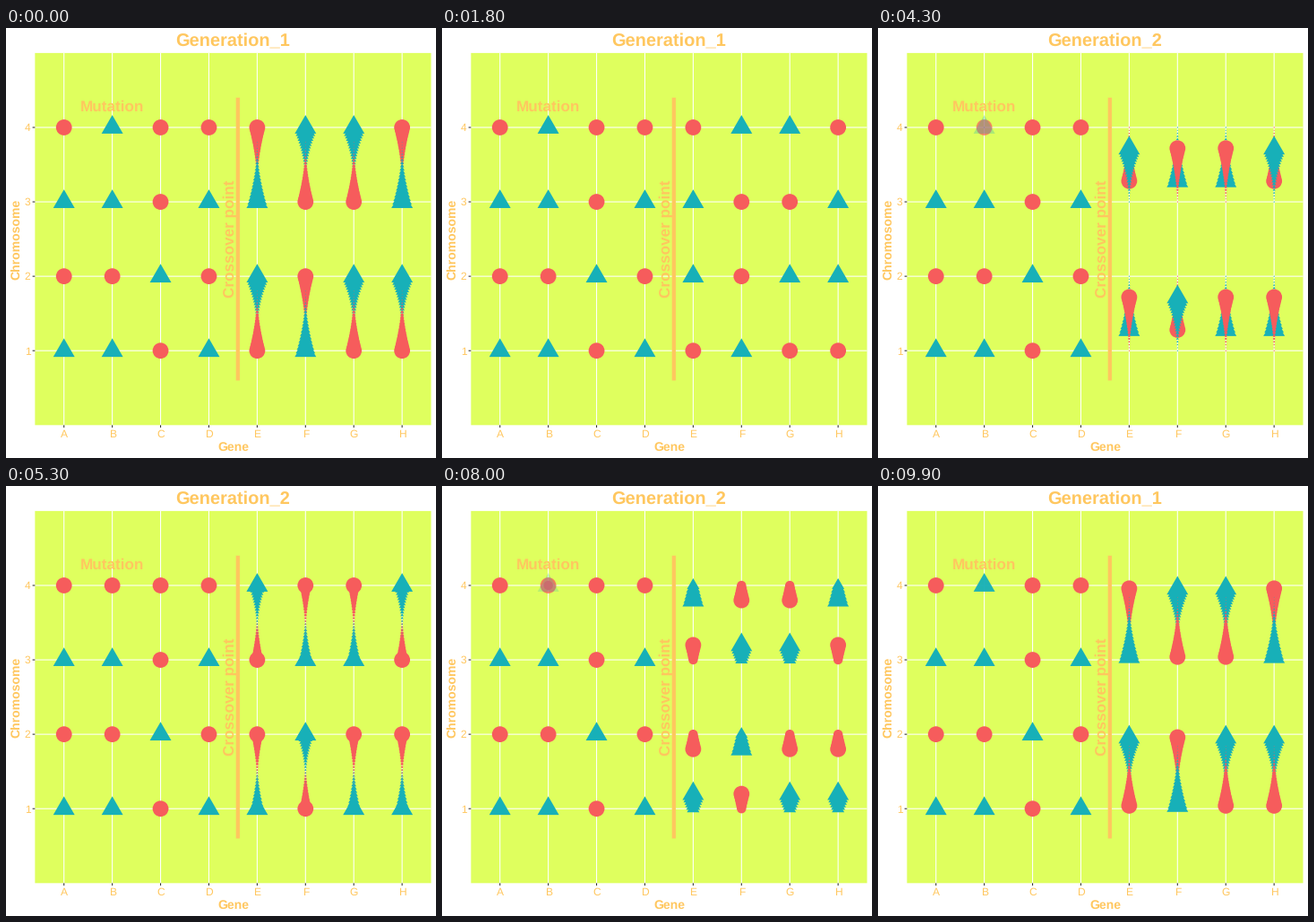
Animation, 480 px wide and 480 px high, one loop 10 s. Source, as a matplotlib script:

```python
import numpy as np
import matplotlib.pyplot as plt
from matplotlib.animation import FuncAnimation
from matplotlib.collections import PathCollection
from matplotlib.colors import to_rgba
from matplotlib.patches import Rectangle
from matplotlib.path import Path

SIZE, DPI = 480, 72
FRAMES, PHASE, WAKE = 100, 25, 20
LIME, AMBER, RED, TEAL = "#dfff5e", "#ffc75f", "#f65c5c", "#17b0b8"
LEFT, RIGHT, TOP, BOTTOM = 32.35, 474.5, 27.9, 443.3

# Rows 1 to 4, genes A to H; T is a triangle, C a circle.
GENES = ["TTCTCTCC", "CCTCTCTT", "TTCTTCCT", "CTCCCTTC"]
PARTNER = {1: 2, 2: 1, 3: 4, 4: 3}
MUTANT = (2, 4)


def px(gene):
    return LEFT + (gene - 0.4) * (RIGHT - LEFT) / 8.2


def py(row):
    return BOTTOM - row * (BOTTOM - TOP) / 5


plt.rcParams.update({"font.family": "Liberation Sans",
                     "text.hinting": "none", "text.kerning_factor": 6})
fig = plt.figure(figsize=(SIZE / DPI, SIZE / DPI), dpi=DPI, facecolor="white")
ax = fig.add_axes([0, 0, 1, 1])
ax.set(xlim=(0, SIZE), ylim=(SIZE, 0))
ax.axis("off")


def line(x, y, color, width, z):
    ax.plot(x, y, color=color, lw=width, solid_capstyle="butt", zorder=z,
            snap=False)


def label(x, y, text, size, weight="bold", ha="center", **kw):
    return ax.text(x, y, text, size=size, weight=weight, ha=ha,
                   va="baseline", color=AMBER, zorder=4, **kw)


def upright(x, y, text, size):
    label(x, y, text, size, rotation=90, rotation_mode="anchor")


ax.add_patch(Rectangle((LEFT, TOP), RIGHT - LEFT, BOTTOM - TOP, fc=LIME, lw=0,
                       snap=False))
for row in range(1, 5):
    y = py(row)
    line([LEFT, RIGHT], [y, y], "white", 1.07, 2)
    line([LEFT - 2.75, LEFT], [y, y], "#333333", 1.07, 2)
    label(27.4, y + 4.3, str(row), 12, "normal", "right")
for gene, name in enumerate("ABCDEFGH", 1):
    x = px(gene)
    line([x, x], [TOP, BOTTOM], "white", 1.07, 2)
    line([x, x], [BOTTOM, BOTTOM + 2.75], "#333333", 1.07, 2)
    label(x, 456.9, name, 12, "normal")

line([px(4.6)] * 2, [py(0.6), py(4.4)], AMBER, 4.27, 3)
label(px(2), 92.7, "Mutation", 17.07)
upright(px(4.4) + 6.3, py(2.5), "Crossover point", 17.07)
label((LEFT + RIGHT) / 2, 471.6, "Gene", 14)
upright(15.6, py(2.5), "Chromosome", 14)
title = label((LEFT + RIGHT) / 2, 20, "", 20)

points = ax.add_collection(PathCollection([], linewidths=0, zorder=5))


def progress(f):
    """0 in the first generation, 1 in the second, linear between."""
    f %= FRAMES
    return float(np.interp(f / PHASE, [0, 1, 2, 3, 4], [0, 0, 1, 1, 0]))


def glyph(kind, x, y, scale=1.0, alpha=1.0):
    r = 0.375 * (8 * 2.845 * scale + 0.945)
    if kind == "C":
        return Path.circle((x, y), r), to_rgba(RED, alpha)
    base, half = y + 0.7776 * r, 1.3468 * r
    corners = [(x, y - 1.5551 * r), (x + half, base), (x - half, base)]
    return Path(corners + corners[:1], closed=True), to_rgba(TEAL, alpha)


def wake(f):
    """Past frames with their point scale, oldest first, ending at f."""
    return [(f - age, (1 - age / WAKE) ** 2) for age in range(WAKE, -1, -1)]


def mover(f, start, gene):
    for g, scale in wake(f):
        y = py(start + (PARTNER[start] - start) * progress(g))
        yield glyph(GENES[start - 1][gene - 1], px(gene), y, scale)


def mutant(f):
    x, y = px(MUTANT[0]), py(MUTANT[1])
    for g, scale in wake(f):
        p = progress(g)
        if g < f and 0 < p < 1:
            continue  # fading points leave no wake
        for kind, alpha in (("C", p), ("T", 1 - p)):
            if alpha > 0:
                yield glyph(kind, x, y, scale, alpha)


def draw(f):
    shapes = list(mutant(f))
    for row in range(1, 5):
        for gene in range(1, 5):
            if (gene, row) != MUTANT:
                shapes.append(glyph(GENES[row - 1][gene - 1], px(gene), py(row)))
    for start in (2, 1, 4, 3):
        for gene in range(5, 9):
            shapes += mover(f, start, gene)
    paths, colors = zip(*shapes)
    points.set_paths(paths)
    points.set_facecolor(colors)
    title.set_text(f"Generation_{2 if 38 < f <= 88 else 1}")
    return points, title


anim = FuncAnimation(fig, draw, frames=FRAMES, interval=100,
                     init_func=lambda: draw(0), repeat=True, repeat_delay=0)
plt.show()
```
